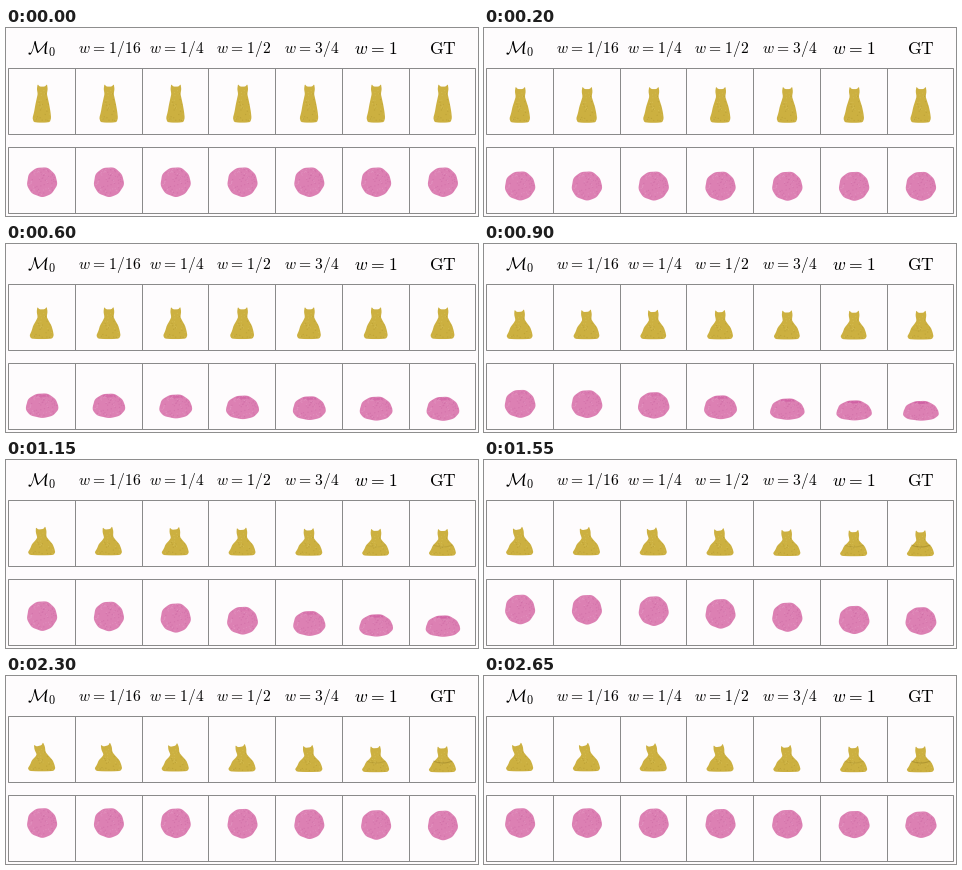
Animation of 472x188 px, one loop 2.7 s. Source, as a matplotlib script:

```python
import numpy as np
import matplotlib.pyplot as plt
from matplotlib.animation import FuncAnimation
from matplotlib.patches import Polygon, Rectangle

W, H, DPI = 472, 188, 100
STEP, FRAMES, COLS = 50, 54, 7
PX = 72 / DPI
PAPER, LINE = "#fefcfd", "#8a8a8a"
GOLD, GOLD_DARK, GOLD_LIGHT = "#ccb040", "#b2972f", "#dac45c"
PINK, PINK_DARK, PINK_LIGHT = "#dc80b3", "#cb66a2", "#e69cc6"

plt.rcParams["mathtext.fontset"] = "cm"
rng = np.random.default_rng(4)
centers = 36 + 66.8 * np.arange(COLS)
# 0 = stiff material (first column), 1 = soft material (last column)
softness = np.sin(np.pi / 12 * np.arange(COLS)) ** 2.6

# Half outline of the sitting cat: half width and height, from ears to base
PROFILE = np.array([(2.6, 58.6), (4.7, 56.2), (5.4, 61), (4.6, 66), (5.6, 70.5),
                    (7, 77), (8.2, 84), (8.8, 90), (7.6, 94), (3, 94.6)])
NECK, BASE = 67, 94.6


def ramp(t, start, end):
    return np.clip((t - start) / (end - start), 0, 1)


def rounded(pts):
    """Cut every corner of a closed outline once."""
    ahead = np.roll(pts, -1, axis=0)
    cuts = np.stack([0.82 * pts + 0.18 * ahead, 0.18 * pts + 0.82 * ahead], axis=1)
    return cuts.reshape(-1, 2)


def full_cat():
    left = PROFILE * [-1, 1]
    left[:, 0] -= ramp(left[:, 1], 87, 90)  # tail
    return rounded(np.vstack([PROFILE, left[::-1]]))


def pose_cat(pts, col, t):
    """Let the body sag and spread while the head sinks and tilts."""
    x, y = pts.T
    soft = softness[col]
    sag = 1 - (1 - ramp(t, 0, 1250)) ** 1.5
    drop = 10.8 * sag + 3 * soft * ramp(t, 600, 1500)
    base = BASE + 0.7 * sag + soft * ramp(t, 600, 1500)

    tilt = np.radians(15) * ramp(t, 500, 1950) * (1 - 0.8 * soft) * ramp(y, 73, 65)
    dy = y - 71
    x, y = (x * np.cos(tilt) + dy * np.sin(tilt),
            71 + dy * np.cos(tilt) - x * np.sin(tilt))

    x = x * (1 + 0.48 * sag * ramp(y, NECK, 77))
    body = NECK + drop + (y - NECK) * (base - NECK - drop) / (BASE - NECK)
    y = np.where(y < NECK, y + drop, body)
    return np.column_stack([centers[col] + 0.3 + x, y])


def ball_state(col, t):
    """Centre height, half width, half height and squash of a bouncing ball."""
    s = softness[col]
    hit, peak = 600 + 350 * s, 1900 + 600 * s
    low, high = 161.5 + 5.2 * s, 146.8 + 1.7 * s
    fall = np.sin(np.pi / 2 * ramp(t, 0, hit))
    rise = (1 - np.cos(np.pi * ramp(t, hit, peak))) / 2
    cy = 154 + (low - 154) * fall + (high - low) * rise

    squash = (5.2 + 4.8 * s) * np.exp(-((t - hit) / (280 + 180 * s)) ** 2)
    wobble = 3.2 * s ** 3 * np.cos(np.pi * (t - 1950) / 700) * ramp(t, 1400, 1900)
    height = 29.8 - squash + wobble
    return cy, 15 * (30 / height) ** 0.36, height / 2, squash / 10


def pose_ball(unit, col, t):
    """Map unit-disc points onto the ball, flattening the underside on impact."""
    cy, half_w, half_h, squash = ball_state(col, t)
    u, v = unit.T
    v = np.where(v > 0, np.abs(v) ** (1 - 0.4 * squash), v)
    return np.column_stack([centers[col] + half_w * u * (1 + 0.1 * squash * v),
                            cy + half_h * v])


def polar(r, a):
    return np.column_stack([r * np.cos(a), r * np.sin(a)])


cat_shape = full_cat()
angle = np.linspace(0, 2 * np.pi, 60, endpoint=False)
ball_shape = polar(0.99 + 0.014 * np.sin(9 * angle) + 0.012 * np.sin(5 * angle + 1), angle)
cap_shape = polar(1, angle) * [0.45, 0.12] + [0, -0.8]

GRAINS, SPOTS = 34, 80
grain_y = rng.uniform(60, 93, GRAINS)
grain_w = np.interp(grain_y, PROFILE[1:, 1], PROFILE[1:, 0])
grains = np.column_stack([rng.uniform(-0.9, 0.9, GRAINS) * grain_w, grain_y])
spots = polar(0.94 * np.sqrt(rng.uniform(0, 1, SPOTS)), rng.uniform(0, 2 * np.pi, SPOTS))

fig = plt.figure(figsize=(W / DPI, H / DPI), dpi=DPI, facecolor=PAPER)
ax = fig.add_axes([0, 0, 1, 1])
ax.set_xlim(0, W)
ax.set_ylim(H, 0)
ax.axis("off")

BIG, SMALL = 17.5, 15.6
EQ = r"w\hspace{0.08}=\hspace{0.08}"
labels = [(35.5, r"\mathcal{M}_0", BIG), (103.3, EQ + "1/16", SMALL),
          (171, EQ + "1/4", SMALL), (238, EQ + "1/2", SMALL),
          (306, EQ + "3/4", SMALL), (370.5, EQ + "1", BIG),
          (437, r"\mathrm{GT}", BIG)]
for x, label, size in labels:
    ax.text(x, 26 if size == BIG else 25, f"${label}$", fontsize=size * PX,
            ha="center", va="baseline", color="black")

for top in (40, 119):
    ax.add_patch(Rectangle((2, top), 467, 66, facecolor="none", edgecolor=LINE, lw=PX))
    for k in range(1, COLS):
        x = int(2.5 + 66.75 * k)
        ax.plot([x, x], [top, top + 66], color=LINE, lw=PX)


def add_shapes(color, zorder):
    return [ax.add_patch(Polygon(ball_shape, closed=True, facecolor=color,
                                 edgecolor="none", zorder=zorder))
            for _ in range(COLS)]


def add_dots(count, dark, light):
    colors = [light if i % 2 else dark for i in range(count)] * COLS
    blank = np.zeros(count * COLS)
    return ax.scatter(blank, blank, s=0.8, c=colors, alpha=0.5, linewidths=0, zorder=4)


cats = add_shapes(GOLD, 3)
balls = add_shapes(PINK, 3)
caps = add_shapes("#c84a99", 3.5)
creases = [ax.plot([], [], color="#8f7820", lw=0.8, zorder=5)[0] for _ in range(COLS)]
cat_dots = add_dots(GRAINS, GOLD_DARK, GOLD_LIGHT)
ball_dots = add_dots(SPOTS, PINK_DARK, PINK_LIGHT)
crease_x = np.linspace(-9, 9, 15)
crease_y = 87 - 1.8 * (crease_x / 9) ** 2


def update(frame):
    t = frame * STEP
    for c in range(COLS):
        cats[c].set_xy(pose_cat(cat_shape, c, t))
        balls[c].set_xy(pose_ball(ball_shape, c, t))
        caps[c].set_xy(pose_ball(cap_shape, c, t))
        caps[c].set_alpha(0.6 * ball_state(c, t)[3])
        creases[c].set_data(centers[c] + crease_x, crease_y)
        creases[c].set_alpha(0.45 * softness[c] ** 8 * ramp(t, 800, 1500))
    cat_dots.set_offsets(np.vstack([pose_cat(grains, c, t) for c in range(COLS)]))
    ball_dots.set_offsets(np.vstack([pose_ball(spots, c, t) for c in range(COLS)]))
    return [*cats, *balls, *caps, *creases, cat_dots, ball_dots]


anim = FuncAnimation(fig, update, frames=FRAMES, interval=STEP, repeat=True,
                     repeat_delay=0, blit=False)
plt.show()
```
